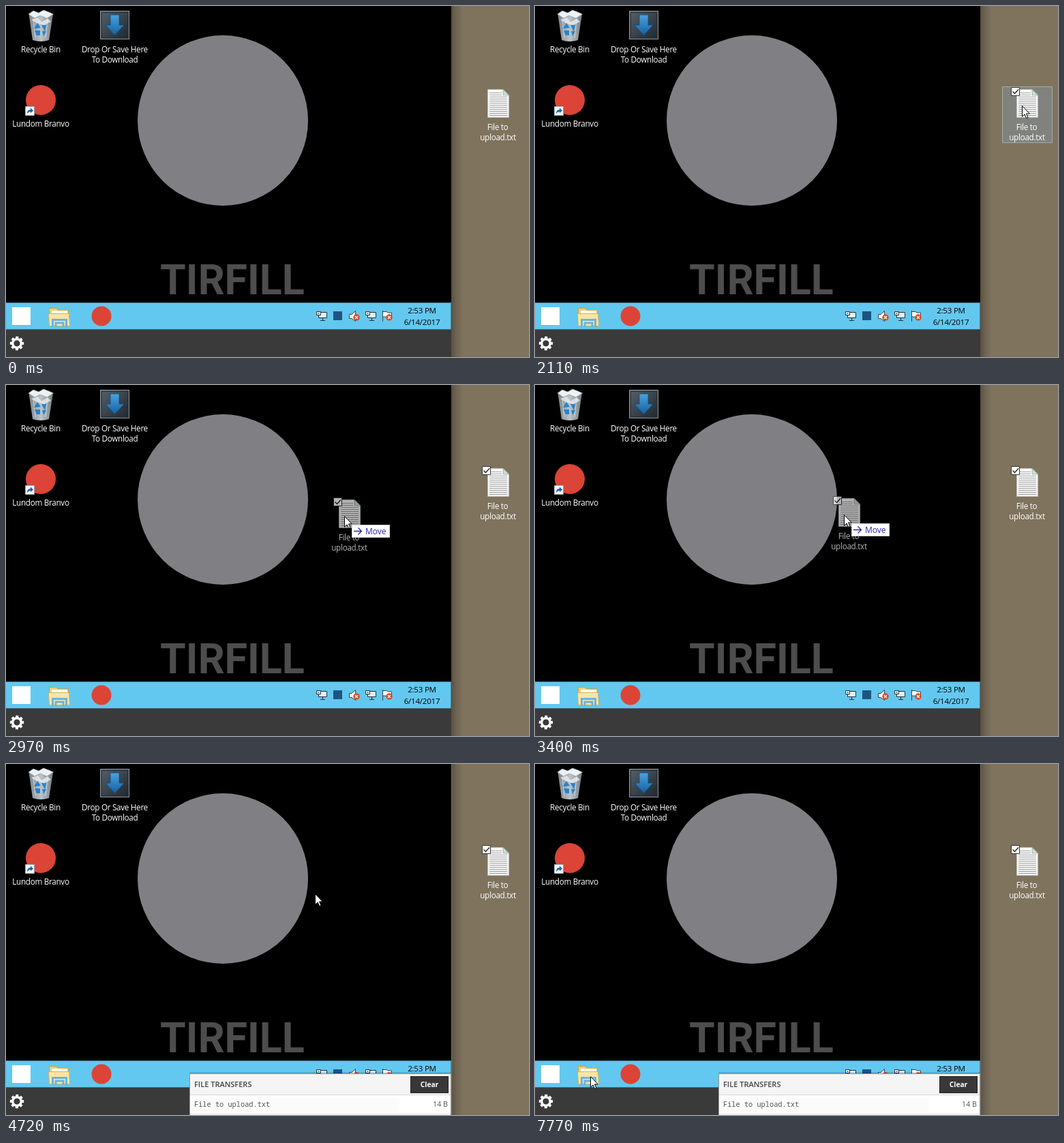
Write an HTML page that moves like this. It is 767 by 515 pixels and loops after 8000 ms.

```html
<!DOCTYPE html>
<html lang="en">
<head>
<meta charset="utf-8">
<title>Drag to upload</title>
<style>
  html, body { margin: 0; width: 100%; height: 100%; overflow: hidden; background: #000; }
  svg { display: block; width: 767px; height: 515px; }
  text { font-family: "Open Sans", "Noto Sans", sans-serif; }
  .label { font-size: 11.7px; font-weight: 500; letter-spacing: -.3px; fill: #fff; text-anchor: middle; }
  .clock { font-size: 11.6px; letter-spacing: -.25px; fill: #000; text-anchor: middle; }
  .word { font: 700 61px Roboto, sans-serif; fill: #4d4d4d; text-anchor: middle; }
  .mono { font: 10.3px "Noto Sans Mono", monospace; fill: #555; }
</style>
</head>
<body>
<svg viewBox="0 0 767 515">
  <defs>
    <linearGradient id="shade">
      <stop offset="0" stop-color="#000" stop-opacity=".3"/>
      <stop offset=".4" stop-color="#000" stop-opacity=".14"/>
      <stop offset="1" stop-color="#000" stop-opacity="0"/>
    </linearGradient>
    <linearGradient id="glass">
      <stop offset="0" stop-color="#87949c"/>
      <stop offset=".5" stop-color="#d3dade"/>
      <stop offset="1" stop-color="#7f8b92"/>
    </linearGradient>
    <linearGradient id="paper" x2="0" y2="1">
      <stop offset="0" stop-color="#fff"/>
      <stop offset="1" stop-color="#f0f0f0"/>
    </linearGradient>
    <linearGradient id="blue" x2="0" y2="1">
      <stop offset="0" stop-color="#4aa3dc"/>
      <stop offset="1" stop-color="#155f9e"/>
    </linearGradient>
    <linearGradient id="steel" x2="1" y2="1">
      <stop offset="0" stop-color="#56616b"/>
      <stop offset="1" stop-color="#1e262d"/>
    </linearGradient>

    <g id="file">
      <path d="M706.5 122.5H729L737.5 131V163.5H706.5Z" fill="url(#paper)" stroke="#b9bdb9"/>
      <path d="M729 122.5V131H737.5Z" fill="#cfe0d4" stroke="#8fa396" stroke-width=".8"/>
      <path d="M709 127.5H727M709 130.5H727" stroke="#a0a0a0"/>
      <path d="M722 133V161" stroke="#a0a0a0" stroke-width="26" stroke-dasharray="1 2"/>
      <text class="label" x="721" y="182">File to</text>
      <text class="label" x="721.5" y="197">upload.txt</text>
    </g>
    <path id="box" d="M698.5 119.5H710.5V131.5H698.5Z" fill="#fff" stroke="#333"/>
    <path id="tick" d="M700.5 125.5L703.5 128.5L709 122.5" fill="none" stroke="#222" stroke-width="1.3"/>

    <g id="screen" fill="#dff3fb" stroke="#23323a">
      <path d="M3.5 2.5H15.5V10.5H3.5ZM6 14.5H13M9.5 11V14"/>
      <path d="M.5 1.5H6.5V6.5H.5Z" fill="#fff"/>
      <path d="M2 4H5"/>
    </g>
    <g id="cross">
      <circle cx="12" cy="11" r="4.7" fill="#d9481c"/>
      <path d="M10 9L14 13M14 9L10 13" stroke="#fff" stroke-width="1.4"/>
    </g>
  </defs>

  <rect width="767" height="515" fill="#7f735e"/>
  <rect x="653" width="17" height="515" fill="url(#shade)"/>
  <rect width="653" height="436" fill="#000"/>

  <!-- wallpaper -->
  <circle cx="318" cy="168" r="125" fill="#808084"/>
  <text class="word" x="332" y="423">TIRFILL</text>

  <!-- desktop icons -->
  <path d="M33.5 12L39 50Q51 54 63 50L69 12Z" fill="url(#glass)" opacity=".9"/>
  <path d="M33 12L40 7 48 10 55 6 63 9 69.5 12 60 18 50 14 42 18Z" fill="#eef1f3" stroke="#929ba1" stroke-width=".7"/>
  <path d="M37 20L47 17 52 24 61 18 66 23 56 28 45 25Z" fill="#f3f5f6" opacity=".7"/>
  <path d="M40 20L43 47M61 20L58 47" stroke="#fff" opacity=".5"/>
  <path d="M41 33L46 25 51 32ZM52 28L59 28 57 37ZM42 36H50V43H45ZM53 37L59 37 55 44Z" fill="#2484d2"/>
  <text class="label" x="51" y="68">Recycle Bin</text>

  <rect x="138.5" y="7.5" width="42" height="41" fill="url(#steel)" stroke="#8d969d"/>
  <rect x="140.5" y="9.5" width="38" height="37" fill="none" stroke="#2a333b"/>
  <path d="M153 13H166V28H173L159.5 43 146 28H153Z" fill="url(#blue)" stroke="#0f4d80" stroke-width=".8"/>
  <text class="label" x="159.5" y="68">Drop Or Save Here</text>
  <text class="label" x="159.5" y="83">To Download</text>

  <circle cx="51" cy="138" r="22" fill="#db4437"/>
  <path d="M28.5 147.5H41.5V160.5H28.5Z" fill="#f4f7fa" stroke="#9aa7b2"/>
  <path d="M31 158Q31 152 36 152V149.5L40 153.5 36 157V155Q33 155 31 158Z" fill="#1d62ab"/>
  <text class="label" x="51" y="177">Lundom Branvo</text>

  <!-- taskbar -->
  <rect y="435" width="653" height="39.5" fill="#3f7f98"/>
  <rect y="436" width="652" height="38.5" fill="#63c8ef"/>
  <rect x="9" y="442" width="27" height="26" fill="#fff"/>
  <path d="M63.5 443.5H74L76 446H91.5V467.5H63.5Z" fill="#f0cf78" stroke="#c9a043"/>
  <path d="M67 447H90V452H67Z" fill="#fffbe9"/>
  <path d="M62.5 451.5H92.5L93.5 469.5H63.5Z" fill="#fbe6a5" stroke="#d5b15a"/>
  <path d="M68.5 471V460.5H88.5V471M73 471V465H84V471" fill="none" stroke="#6bb4dd" stroke-width="3"/>
  <circle cx="140" cy="455" r="14.5" fill="#db4437"/>
  <use href="#screen" x="455" y="447"/>
  <rect x="480" y="448" width="13" height="13" fill="#1f5482"/>
  <path d="M503.5 452.5H507L512.5 447.5V462.5L507 458.5H503.5Z" fill="#fff" stroke="#34464f"/>
  <use href="#cross" x="502" y="446"/>
  <use href="#screen" x="527" y="447"/>
  <path d="M552.5 447V463M552.5 448.5H558L560 450H565.5V457.5H559L557 456H552.5" fill="#fff" stroke="#34464f"/>
  <use href="#cross" x="550" y="446"/>
  <text class="clock" x="610" y="451">2:53 PM</text>
  <text class="clock" x="610" y="468">6/14/2017</text>

  <!-- bottom bar -->
  <rect y="474.5" width="653" height="40.5" fill="#3a3a3a"/>
  <g transform="translate(16 495)" fill="none" stroke="#fff">
    <circle r="6.3" stroke-width="3.4"/>
    <circle r="8.7" stroke-width="3" stroke-dasharray="3.8 3.033" transform="rotate(-12.5)"/>
  </g>

  <!-- transfer panel -->
  <g id="panel">
    <rect x="269" y="452" width="384" height="63" fill="#000" opacity=".15"/>
    <rect x="269.5" y="454.5" width="383" height="61" fill="#fff" stroke="#8f9396"/>
    <rect x="270" y="455" width="382" height="30" fill="#f5f5f5"/>
    <rect x="270" y="485" width="382" height="1" fill="#d6d6d6"/>
    <rect x="270" y="490" width="307" height="20" fill="#fbfbfb"/>
    <rect x="270" y="513" width="382" height="1" fill="#ddd"/>
    <text x="276" y="474" font-size="11" font-weight="600" fill="#444">FILE TRANSFERS</text>
    <rect x="593.5" y="458.5" width="55" height="24" fill="#383838" stroke="#222"/>
    <text x="621" y="474" font-size="10.2" font-weight="700" fill="#fff" text-anchor="middle">Clear</text>
    <text class="mono" x="276" y="503">File to upload.txt</text>
    <text x="648" y="503" font-size="10.7" fill="#555" text-anchor="end">14 B</text>
  </g>
  <rect id="edge" x="653" width="1" height="515" fill="#77736d"/>

  <!-- local file -->
  <rect id="hover" x="685.5" y="118.5" width="73" height="82" fill="#82898a" fill-opacity=".72" stroke="#a3aaa8"/>
  <use href="#file"/>
  <use id="check" href="#box"/>
  <use id="mark" href="#tick"/>

  <!-- pointer and what it drags; origin is the pointer tip -->
  <g id="pointer">
    <g id="drag">
      <g transform="translate(-714 -146)" opacity=".7">
        <use href="#file"/><use href="#box"/><use href="#tick"/>
      </g>
      <rect x="11.5" y="13.5" width="55" height="18" fill="#fff" stroke="#d5d5d5"/>
      <path d="M14 22.5H25M20.5 17.5L25.5 22.5 20.5 27.5" fill="none" stroke="#2a2a9c" stroke-width="1.3"/>
      <text x="31" y="27" font-size="12" fill="#2727b0">Move</text>
    </g>
    <path d="M.5 .7V16.3L4.1 12.9 6.7 18.5 9 17.5 6.5 11.9H11.3Z" fill="#fff" stroke="#000"/>
  </g>
</svg>
<script>
  const LOOP = 8000;

  // Each step is [time in ms, value]; values hold until the next step.
  function play(id, prop, steps) {
    const frames = steps.map(([t, v]) => ({ offset: t / LOOP, [prop]: v, easing: "steps(1, end)" }));
    frames.push({ offset: 1, [prop]: steps[steps.length - 1][1] });
    document.getElementById(id).animate(frames, { duration: LOOP, iterations: Infinity });
  }

  const show = (id, from, to = LOOP) =>
    play(id, "opacity", [[0, 0], [from, 1], ...(to < LOOP ? [[to, 0]] : [])]);

  const path = [
    [0, 683, 473], [820, 681, 378], [1020, 710, 240], [1250, 714, 148],
    [1450, 714, 146], [2340, 708, 150], [2540, 628, 177], [2770, 544, 189],
    [2970, 496, 192], [3200, 456, 191], [3400, 453, 190],
    [7340, 226, 305], [7540, 85, 425], [7770, 81, 458]
  ];

  play("pointer", "transform", path.map(([t, x, y]) => [t, `translate(${x}px, ${y}px)`]));
  show("pointer", 590);
  show("hover", 1250, 2340);
  show("check", 1250);
  show("mark", 2110);
  show("drag", 2540, 4490);
  show("edge", 4490);
  show("panel", 4720);
</script>
</body>
</html>
```
